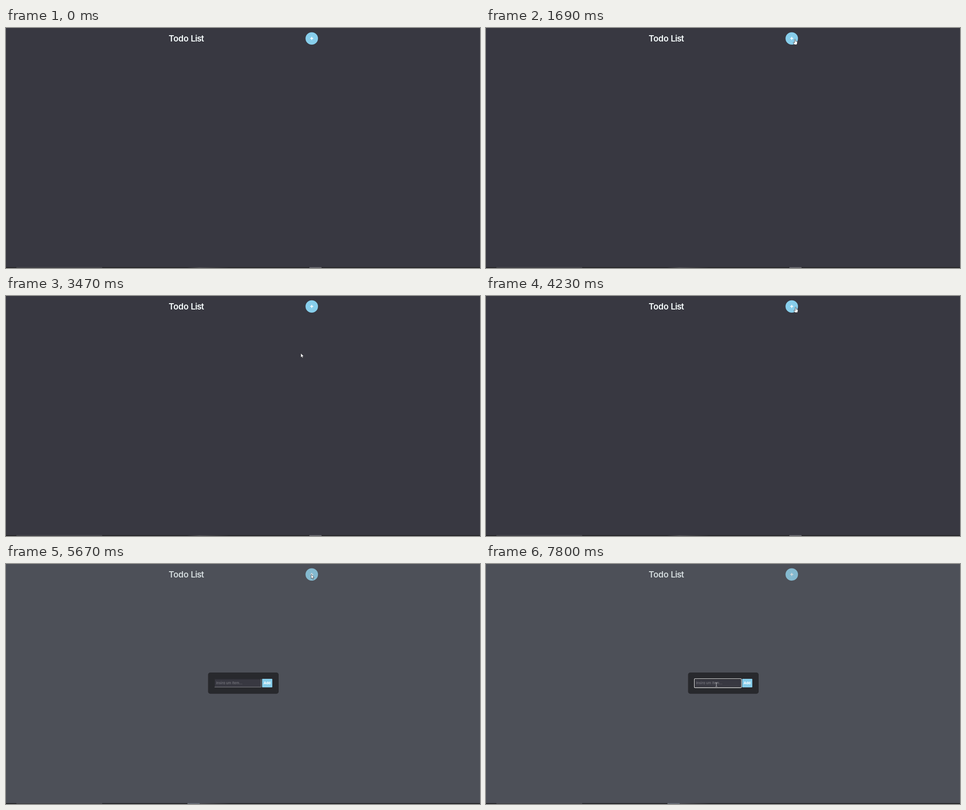
Write an HTML page that moves like this. It is 1050 by 533 pixels and loops after 8000 ms.

```html
<!DOCTYPE html>
<html lang="pt">
<head>
<meta charset="utf-8">
<title>Todo List</title>
<style>
  html, body { margin: 0; width: 100%; height: 100%; overflow: hidden; background: #383841; }
  svg { display: block; width: 100%; height: 100%; }
  text { font-family: Inter, "Open Sans", sans-serif; font-feature-settings: "cv11"; }
  .title { font-size: 18.6px; font-weight: 600; fill: #f8ffff; }
  .hint { font-size: 7.6px; font-weight: 500; fill: #77777e; }
  .add { font-size: 7.8px; font-weight: 700; fill: #fff; text-anchor: middle; }
</style>
</head>
<body>
<svg viewBox="0 0 1050 533">
  <defs>
    <linearGradient id="glow">
      <stop offset="0" stop-color="#4a4a4e" stop-opacity="0"/>
      <stop offset=".3" stop-color="#4a4a4e"/>
      <stop offset="1" stop-color="#4a4a4e" stop-opacity="0"/>
    </linearGradient>
  </defs>
  <rect width="1050" height="533" fill="#383841"/>
  <text class="title" y="30"><tspan x="360.3" letter-spacing="-.3">Todo</tspan><tspan x="409.3" letter-spacing="-.9">List</tspan></text>
  <circle cx="677.3" cy="23.2" r="13.8" fill="#87ceeb"/>
  <path d="M674 23.1h6.6M677.3 19.8v6.6" stroke="#fff" stroke-width="1.8"/>

  <g id="modal">
    <rect width="1050" height="531" fill="#7e888e" opacity=".3"/>
    <rect x="447.6" y="241" width="156.4" height="47.3" rx="5" fill="#28292d"/>
    <rect x="462" y="255.6" width="103.6" height="18.4" fill="#383841"/>
    <path d="M462.5 274V256.1H565" fill="none" stroke="#2d2d33"/>
    <path d="M462 273.4H565V255.6" fill="none" stroke="#77777c" stroke-width="1.2"/>
    <g id="focus" fill="none">
      <rect x="462.6" y="255.9" width="102" height="17.7" stroke="#17171a" stroke-width="1.2"/>
      <rect x="461.6" y="254.8" width="104" height="19.8" rx="1.2" stroke="#fff" stroke-width="1.1"/>
    </g>
    <text class="hint" x="465.4" y="267">Insira um Item...</text>
    <rect id="caret" x="465.6" y="259.5" width=".8" height="9.5" fill="#fff"/>
    <rect x="567.3" y="255.1" width="22.6" height="18.9" rx="1" fill="#87ceeb"/>
    <text class="add" x="578.5" y="267.2">Add</text>
  </g>

  <g>
    <rect y="531" width="1050" height="2" fill="#252528"/>
    <rect x="23" y="531" width="190" height="1.3" fill="#505055"/>
    <rect x="400" y="531" width="95" height="2" fill="url(#glow)"/>
    <rect id="tabA" x="672" y="531" width="27" height="2" fill="#66666a"/>
    <rect id="tabB" x="402" y="531" width="27" height="2" fill="#666c75"/>
  </g>

  <circle id="click" r="6.6" fill="#dce83c" opacity=".78"/>
  <g id="cursor">
    <path id="arrow" d="M0 0V9.6L2.2 7.6 3.7 11 5.2 10.3 3.8 7.1H6.7Z" fill="#fff" stroke="#202024" stroke-width=".7"/>
    <path id="hand" d="M-1.1 1Q0 -.6 1.1 1V4.8L4 5.4Q5.2 5.8 5 8L4 12.4H-1.4L-4 8.4Q-4.2 6.6 -2.6 7.2L-1.1 8.4Z" fill="#fff" stroke="#202024" stroke-width=".7"/>
    <path id="beam" d="M-2 -4.2Q-.3 -4.2 0 -3.5 .3 -4.2 2 -4.2M0 -3.5V3.5M-2 4.2Q-.3 4.2 0 3.5 .3 4.2 2 4.2" fill="none" stroke="#d8d8dc" stroke-width=".9"/>
  </g>
</svg>
<script>
const LOOP = 8000;
const part = id => document.getElementById(id);
const show = (id, on) => part(id).setAttribute('visibility', on ? 'inherit' : 'hidden');
const place = (id, [x, y]) => part(id).setAttribute('transform', `translate(${x} ${y})`);

const moves = [
  { from: 540, to: 1280, steps: 12, path: [[1052, 568], [960, 380], [842, 200], [758, 85], [724, 48]] },
  { from: 1350, to: 1690, steps: 6, path: [[724, 48], [690, 35], [673, 28], [684.6, 24.6]] },
  { from: 2830, to: 3610, steps: 12, path: [[684.6, 24.6], [650, 75], [570, 160], [497, 218], [572, 205], [653, 127], [661, 73]] },
  { from: 3670, to: 4010, steps: 6, path: [[661, 73], [674, 42], [687.6, 24.6]] },
  { from: 4230, to: 4650, steps: 7, path: [[687.6, 24.6], [682, 24], [676, 23]] },
  { from: 6120, to: 6590, steps: 7, path: [[676, 23], [630, 95], [552, 218], [515, 271]] },
  { from: 6870, to: 7060, steps: 3, path: [[515, 271], [510.3, 268]] }
];

function along(path, p) {
  const s = p * (path.length - 1);
  const i = Math.min(Math.floor(s), path.length - 2);
  return path[i].map((v, k) => v + (path[i + 1][k] - v) * (s - i));
}

function pointer(t) {
  const m = moves.filter(m => t >= m.from).pop();
  if (!m) return null;
  const step = Math.floor((t - m.from) / (m.to - m.from) * (m.steps - 1) + 1e-6) + 1;
  return along(m.path, Math.min(1, step / m.steps));
}

function draw(t) {
  const open = t >= 5670;
  const pos = pointer(t);
  const [x, y] = pos || [0, 0];
  const inField = open && x < 566 && y > 254;
  const onButton = t < 5610 && Math.hypot(x - 677.3, y - 23.2) < 14;

  show('modal', open);
  show('focus', open && t >= 7260);
  show('caret', t >= 7260 && t < 7800);
  show('tabA', t < 5610);
  show('tabB', open);

  const firstClick = t >= 5510 && t < 5670;
  show('click', firstClick || (t >= 7260 && t < 7660));
  place('click', firstClick ? [675.6, 23.2] : [507.5, 266]);

  show('cursor', pos);
  place('cursor', [x, y]);
  show('hand', pos && onButton);
  show('beam', pos && inField);
  show('arrow', pos && !onButton && !inField);
}

const start = performance.now();
function tick() {
  draw((performance.now() - start) % LOOP);
  requestAnimationFrame(tick);
}
tick();
</script>
</body>
</html>
```
